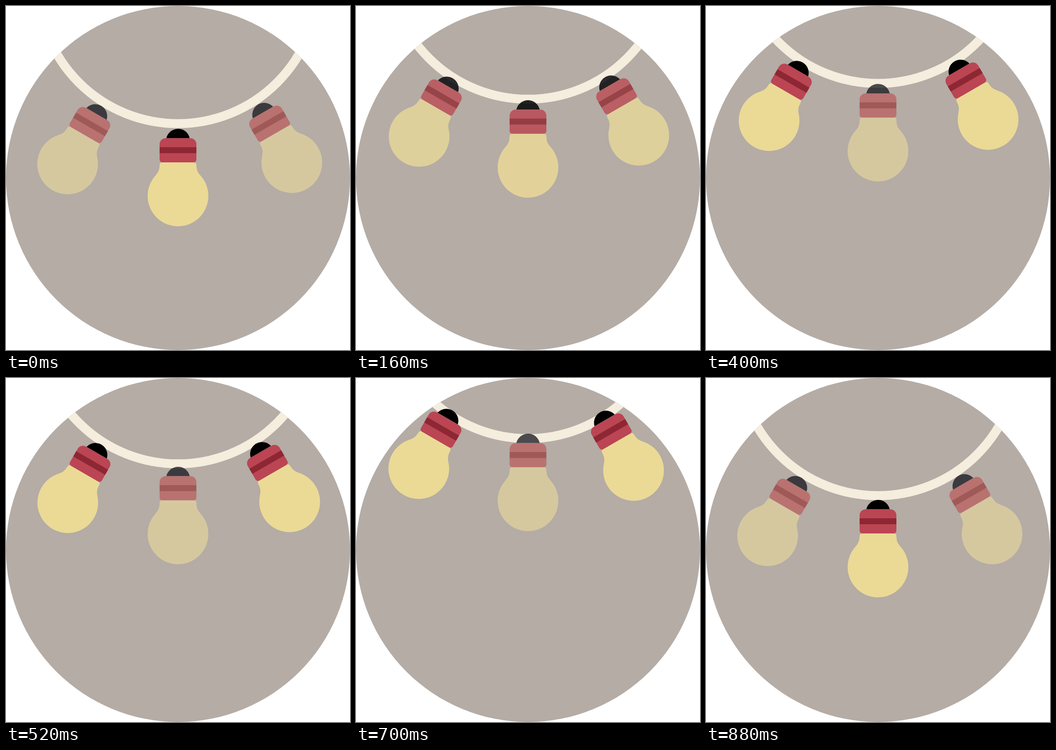
Animation of 748x748 px, one loop 1.01 s. Source, as an HTML page with a canvas:

```html
<!DOCTYPE html>
<html>
<head>
<meta charset="utf-8">
<style>
  html, body { margin: 0; width: 100%; height: 100%; overflow: hidden; background: #fff; }
  canvas { display: block; width: 748px; height: 748px; }
</style>
</head>
<body>
<canvas id="stage" width="748" height="748"></canvas>
<script>
const ctx = document.getElementById('stage').getContext('2d');
const LOOP = 1010, HOLD = 100, STEP = 30, LAST = 27;
const MID = 374;

// Poses at these steps; motion between them is linear
const KEYS = [0, 7, 14, 21, 27];
const ROPE = [246, 122, 186, 122, 246];
const GLOW = [0, 1, 1, 1, 0];
const BULBS = [
  { tilt: 30, x: [134, 141.5, 134, 136.5, 134], y: [343.5, 203.5, 283.5, 197, 343] },
  { tilt: -30, x: [621.5, 606, 619, 603.5, 622], y: [340.5, 201.5, 280.5, 201, 339] },
  { tilt: 0, x: [374, 374, 374, 374, 374], y: [413, 268, 351, 267, 411] }
];

// Colours as [dim, lit], each r, g, b, alpha
const GLASS = [[213, 200, 159, 1], [235, 218, 150, 1]];
const CAP = [[185, 114, 112, 1], [187, 69, 83, 1]];
const BAND = [[159, 90, 88, 1], [141, 39, 51, 1]];
const SOCKET = [[19, 20, 28, 0.75], [0, 0, 0, 1]];

const lerp = (a, b, k) => a + (b - a) * k;

function at(values, step) {
  let i = 0;
  while (i < KEYS.length - 2 && step >= KEYS[i + 1]) i++;
  return lerp(values[i], values[i + 1], (step - KEYS[i]) / (KEYS[i + 1] - KEYS[i]));
}

function mix([dim, lit], k) {
  const c = dim.map((v, i) => lerp(v, lit[i], k));
  return `rgba(${c.slice(0, 3).map(Math.round)},${c[3]})`;
}

function fill(color, trace) {
  ctx.fillStyle = color;
  ctx.beginPath();
  trace();
  ctx.fill();
}

function glassPath() {
  const a = Math.atan2(-43, 50);
  ctx.moveTo(-34, -73);
  ctx.lineTo(34, -73);
  ctx.quadraticCurveTo(40, -73, 40, -67);
  ctx.bezierCurveTo(40, -54, 45, -49, 50, -43);
  ctx.arc(0, 0, 66, a, Math.PI - a);
  ctx.bezierCurveTo(-45, -49, -40, -54, -40, -67);
  ctx.quadraticCurveTo(-40, -73, -34, -73);
}

function capPath() {
  ctx.moveTo(-40, -100);
  ctx.arcTo(-40, -125.5, 0, -125.5, 13);
  ctx.arcTo(40, -125.5, 40, -100, 13);
  ctx.arcTo(40, -73, 0, -73, 6);
  ctx.arcTo(-40, -73, -40, -100, 6);
  ctx.closePath();
}

function socketPath() {
  const a = Math.asin(5.5 / 26);
  ctx.arc(0, -120, 26, Math.PI + a, -a);
}

function drawBulb(x, y, tilt, glow) {
  ctx.save();
  ctx.translate(x, y);
  ctx.rotate(tilt * Math.PI / 180);
  fill(mix(SOCKET, glow), socketPath);
  fill(mix(GLASS, glow), glassPath);
  fill(mix(CAP, glow), capPath);
  fill(mix(BAND, glow), () => ctx.rect(-40, -106, 80, 13));
  ctx.restore();
}

function drawRope(top) {
  ctx.save();
  ctx.beginPath();
  ctx.arc(MID, MID, MID, 0, Math.PI * 2);
  ctx.clip();
  ctx.strokeStyle = '#f5eddd';
  ctx.lineWidth = 19.5;
  ctx.beginPath();
  ctx.arc(MID, top - 295, 304.75, 0, Math.PI);
  ctx.stroke();
  ctx.restore();
}

function draw(ms) {
  const t = ms % LOOP;
  const step = t < HOLD ? 0 : Math.min(LAST, 1 + Math.floor((t - HOLD) / STEP));
  const glow = at(GLOW, step);
  ctx.clearRect(0, 0, 748, 748);
  fill('#b4aca5', () => ctx.arc(MID, MID, MID, 0, Math.PI * 2));
  drawRope(at(ROPE, step));
  for (const b of BULBS) {
    drawBulb(at(b.x, step), at(b.y, step), b.tilt, b.tilt ? glow : 1 - glow);
  }
}

const start = performance.now();
function tick() {
  draw(Math.max(0, performance.now() - start));
  requestAnimationFrame(tick);
}
tick();
</script>
</body>
</html>
```
